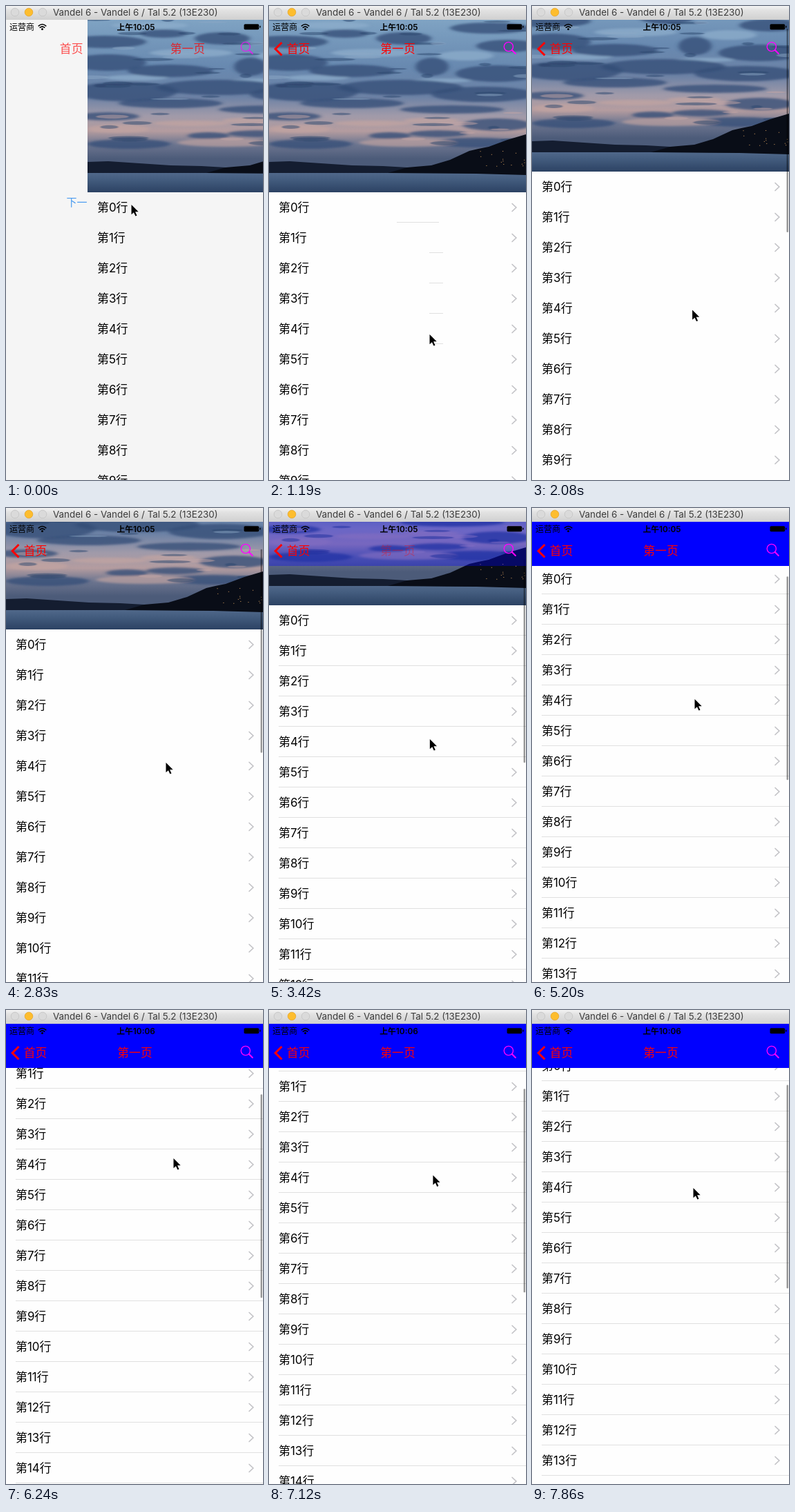
An HTML page for the animation above (8000 ms loop, 372x687 px).

```html
<!DOCTYPE html>
<html lang="zh-CN">
<head>
<meta charset="utf-8">
<title>第一页</title>
<style>
html, body { margin: 0; width: 100%; height: 100%; overflow: hidden; background: #fefefe; }
#stage { display: block; width: 100vw; height: 100vh; font-family: Inter, "Noto Sans CJK SC", "Noto Sans CJK", sans-serif; }
.mid { text-anchor: middle; }
.line { fill: none; stroke-linecap: round; }
</style>
</head>
<body>
<svg id="stage" viewBox="0 0 372 687" xmlns="http://www.w3.org/2000/svg">
  <defs>
    <linearGradient id="sky" x2="0" y2="1">
      <stop offset="0" stop-color="#7fa3c3"/>
      <stop offset=".3" stop-color="#6889b0"/>
      <stop offset=".5" stop-color="#6d82a5"/>
      <stop offset=".62" stop-color="#a09aa9"/>
      <stop offset=".72" stop-color="#b49c9f"/>
      <stop offset=".8" stop-color="#6f7791"/>
      <stop offset=".9" stop-color="#4c5b79"/>
    </linearGradient>
    <linearGradient id="water" x2="0" y2="1">
      <stop offset="0" stop-color="#50688a"/>
      <stop offset=".35" stop-color="#435c7e"/>
      <stop offset="1" stop-color="#2c4263"/>
    </linearGradient>
    <linearGradient id="chrome" x2="0" y2="1">
      <stop offset="0" stop-color="#f3f3f3"/>
      <stop offset=".3" stop-color="#e2e2e2"/>
      <stop offset="1" stop-color="#d0d0d0"/>
    </linearGradient>
    <filter id="soft" x="-10%" y="-10%" width="120%" height="120%"><feGaussianBlur stdDeviation="3 1.8"/></filter>
    <filter id="fine"><feGaussianBlur stdDeviation="1.2 .6"/></filter>
  </defs>

  <rect width="372" height="687" fill="#f5f5f5"/>
  <g id="home"><text class="mid" x="186.5" y="290" font-size="15" fill="#4a9bf0">下一页</text></g>

  <g id="page">
    <rect id="paper" y="20" width="372" height="667"/>
    <g id="scroll">
      <svg y="20" width="372" height="250">
        <rect width="372" height="224" fill="url(#sky)"/>
        <g id="clouds" filter="url(#soft)"></g>
        <g id="streaks" filter="url(#fine)"></g>
        <path d="M0 206L30 205 75 208 120 211 165 212 200 214V223H0z" fill="#141d30"/>
        <rect y="222" width="372" height="28" fill="url(#water)"/>
        <path d="M172 222L200 214 235 211 262 203 290 190 303 187 318 184 345 174 372 166V225L300 223z" fill="#090d17"/>
        <g id="lights" fill="#b98a55"></g>
      </svg>
      <g id="rows"></g>
      <g id="trail" fill="#e0e0e0"></g>
    </g>
    <rect id="thumb" x="368.5" width="2.5" height="295" rx="1.2" fill="#000" opacity=".4"/>
  </g>

  <rect id="bar" y="20" width="372" height="64" fill="#00f"/>
  <path id="back" class="line" d="M18.5 53L9.2 62.2 18.5 71.5" stroke="#f00" stroke-width="3" style="stroke-linecap:butt"/>
  <text id="backText" class="mid" x="42.5" y="68" font-size="16.8" fill="#f00">首页</text>
  <text id="title" class="mid" x="186.5" y="68" font-size="16.8" font-weight="500" fill="#f00">第一页</text>
  <g id="search" class="line" stroke="#f0f" stroke-width="1.4">
    <circle cx="346.8" cy="59" r="6.6"/>
    <path d="M351.8 64L356.8 69" stroke-width="2"/>
  </g>

  <text x="5" y="34.5" font-size="12">运营商</text>
  <g class="line" stroke="#000" stroke-width="1.6">
    <path d="M47.2 28.8q5.3-4.6 10.6 0M49.3 31.2q3.2-2.8 6.4 0"/>
    <circle cx="52.5" cy="33.6" r=".7"/>
  </g>
  <text id="clock" class="mid" x="188" y="34.5" font-size="11.8" font-weight="600"></text>
  <rect x="344.5" y="26.2" width="21.6" height="8" rx="1.6" fill="#000"/>
  <rect x="367" y="28.6" width="1.4" height="3.2" rx=".7"/>

  <rect width="372" height="20" fill="url(#chrome)"/>
  <g id="buttons"></g>
  <text x="68" y="14" font-size="13.4" fill="#3c3c3c">Vandel 6 - Vandel 6 / Tal 5.2 (13E230)</text>

  <path id="cursor" d="M0 0V14.2L3.4 11.2 5.9 16.6 8 15.7 5.6 10.3H10.2z" stroke="#fff" stroke-width="1" paint-order="stroke"/>
</svg>
<script>
const LOOP = 8000, TICKS = 54, ROW = 44, TOP = 270;
const $ = id => document.getElementById(id);
const set = (id, attrs) => { for (const name in attrs) $(id).setAttribute(name, attrs[name]); };
const fill = (id, items, draw) => { $(id).innerHTML = items.map(draw).join(''); };
const range = n => Array.from({ length: n }, (_, i) => i);
const clamp = v => Math.max(0, Math.min(1, v));

let seed = 11;
const random = () => (seed = seed * 16807 % 2147483647) / 2147483647;
const ellipse = (x, y, rx, ry, color, opacity) =>
  `<ellipse cx="${x}" cy="${y}" rx="${rx}" ry="${ry}" fill="${color}" opacity="${opacity}"/>`;

// Cloud masses: x, y, rx, ry
const dark = [
  [25, 32, 60, 9], [110, 20, 34, 6], [195, 27, 40, 9], [320, 12, 58, 8], [345, 38, 45, 9],
  [236, 68, 24, 13], [30, 62, 55, 12], [120, 74, 62, 9], [330, 78, 60, 12], [190, 98, 90, 11],
  [55, 104, 75, 14], [310, 108, 75, 11], [120, 121, 75, 7], [265, 130, 75, 6], [30, 140, 45, 6],
  [175, 168, 30, 5], [245, 165, 42, 5], [330, 152, 50, 9], [60, 180, 60, 7], [300, 178, 60, 7]
];
const light = [
  [150, 48, 60, 6], [70, 84, 45, 4], [285, 52, 40, 7], [90, 8, 55, 5], [250, 88, 42, 3]
];
const glow = [[45, 158, 45, 6], [200, 178, 70, 6], [150, 150, 55, 4], [235, 146, 40, 4]];
fill('clouds', [
  ...light.map(c => [...c, '#8eaecb', .75]),
  ...dark.map(c => [...c, '#344f78', .78]),
  ...glow.map(c => [...c, '#c4a5a2', .65])
], c => ellipse(...c));
fill('streaks', range(46), () => {
  const y = random() * 188;
  const color = random() < .65 ? '#2e466d' : y > 125 ? '#c3a6a5' : '#8ba8c5';
  return ellipse(random() * 372, y, 8 + random() * 22, 1 + random() * 2.2, color, .5);
});
fill('lights', range(16), () =>
  `<rect x="${305 + random() * 65}" y="${190 + random() * 24}" width="1.2" height="1"/>`);

fill('rows', range(18), i => `<g transform="translate(0 ${TOP + ROW * i})">
  <text x="14" y="28" font-size="16.9">第${i}行</text>
  <path class="line" d="M352 16.5L357.8 22 352 27.5" stroke="#c4c4c8" stroke-width="1.7"/>
  <rect class="rule" x="14" y="43" width="358" height="1" fill="#e0e0e0"/></g>`);
fill('trail', range(5), i =>
  `<rect x="${i ? 232 : 185}" y="${TOP + ROW * (i + 1) - 1}" width="${i ? 20 : 61}" height="1"/>`);
fill('buttons', ['#dadada', '#fdbd2e', '#dadada'], (color, i) =>
  `<circle cx="${13 + 20 * i}" cy="9" r="5.8" fill="${color}" stroke="${i === 1 ? '#e5a528' : '#c3c3c3'}" stroke-width=".8"/>`);

// Keys are [tick, value]
const scrollKeys = [[0, 0], [10, 0], [19, 94], [27, 156], [35, 189], [42, 244], [53, 211]];
const pointer = [
  [0, 181.5, 288], [2, 195, 299], [4, 232, 310], [8, 232.5, 476], [10, 232.5, 476],
  [19, 231.5, 369], [27, 234.5, 309], [35, 235.5, 277], [42, 242.5, 215], [53, 233.5, 258]
];
const pointerX = pointer.map(([k, x]) => [k, x]);
const pointerY = pointer.map(([k, , y]) => [k, y]);

// Monotone cubic curve through the keys
function curve(keys, k) {
  const slope = i => (keys[i + 1][1] - keys[i][1]) / (keys[i + 1][0] - keys[i][0]);
  const tangent = i => {
    if (i === 0 || i === keys.length - 1) return 0;
    const a = slope(i - 1), b = slope(i);
    return a * b > 0 ? 2 * a * b / (a + b) : 0;
  };
  let i = 0;
  while (i < keys.length - 2 && k > keys[i + 1][0]) i++;
  const [k0, v0] = keys[i], [k1, v1] = keys[i + 1];
  const span = k1 - k0, u = clamp((k - k0) / span), w = 1 - u;
  return v0 * (1 + 2 * u) * w * w + tangent(i) * span * u * w * w
    + v1 * u * u * (3 - 2 * u) - tangent(i + 1) * span * u * u * w;
}

function render(time) {
  const k = Math.floor(time % LOOP / LOOP * TICKS);
  const push = k < 4 ? .316 * .35 ** k : 0;
  const offset = Math.round(curve(scrollKeys, k));
  const shade = clamp((offset - 100) / 86);
  const x = curve(pointerX, k), y = curve(pointerY, k);
  const fade = 1 - push;

  set('home', { transform: `translate(${-112 * fade})`, visibility: push ? 'visible' : 'hidden' });
  set('page', { transform: `translate(${Math.round(372 * push)})` });
  set('paper', { fill: k < 2 ? '#f5f5f5' : '#fefefe' });
  set('scroll', { transform: `translate(0 ${-offset})` });
  set('thumb', { y: 20.5 + .417 * offset, visibility: k > 10 ? 'visible' : 'hidden' });
  set('bar', { opacity: shade });
  set('back', { opacity: clamp(1 - 4 * push) });
  set('backText', { x: 42.5 + 165 * push, opacity: fade });
  set('title', { x: 186.5 + 242 * push, opacity: k > 10 ? shade : 1 - .8 * push });
  set('search', { opacity: fade });
  set('cursor', { transform: `translate(${x} ${y})` });
  $('clock').textContent = k < 38 ? '上午10:05' : '上午10:06';

  document.querySelectorAll('.rule').forEach(r => r.setAttribute('visibility', k >= 23 ? 'visible' : 'hidden'));
  [...$('trail').children].forEach((r, i) => {
    const passed = k <= 10 && y + 17 > TOP + ROW * (i + 1) && k > 2;
    r.setAttribute('visibility', passed ? 'visible' : 'hidden');
  });
}

const start = performance.now();
function frame() {
  render(performance.now() - start);
  requestAnimationFrame(frame);
}
frame();
</script>
</body>
</html>
```
